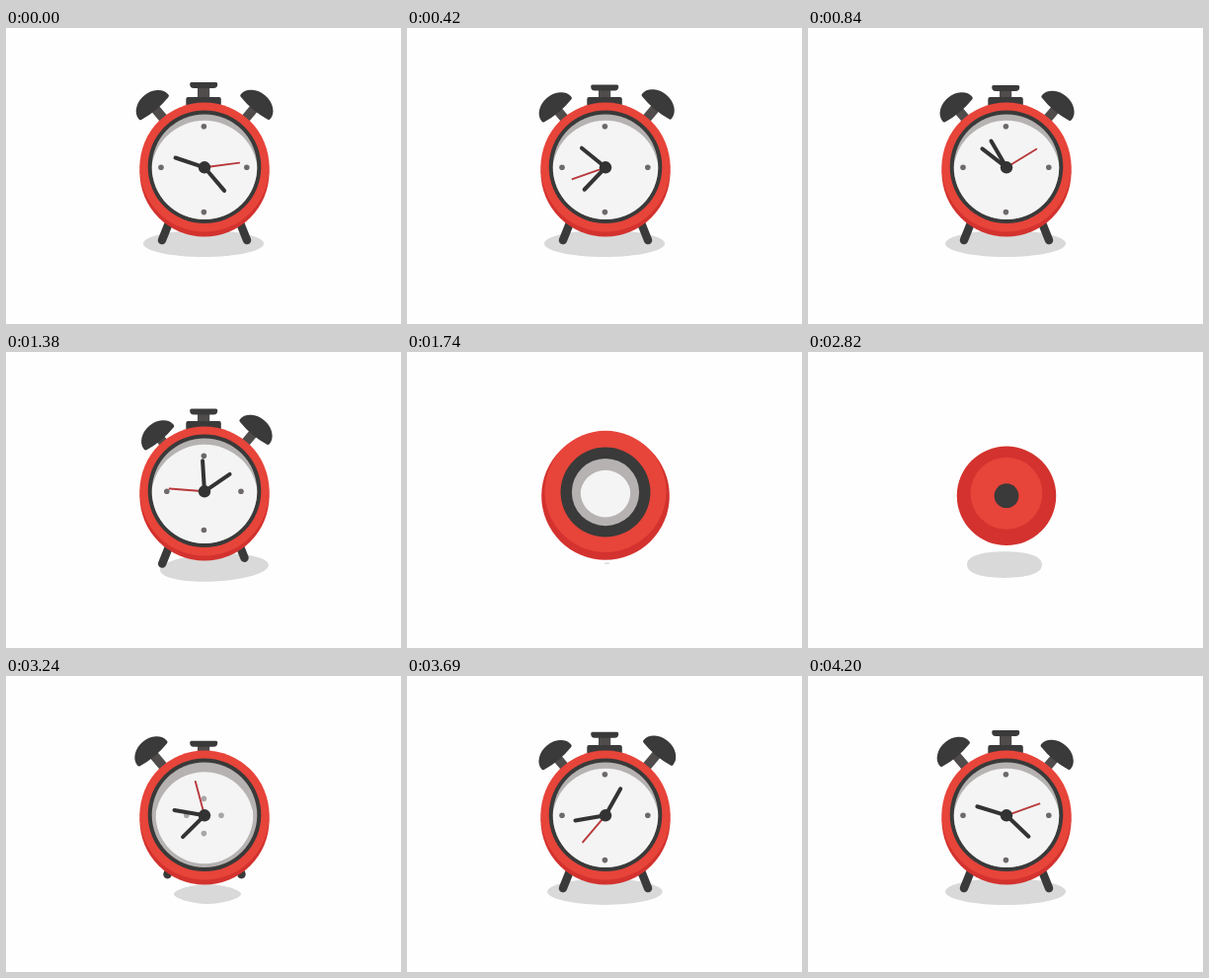
Animation, 400 px wide and 300 px high, one loop 4230 ms. Source, as an HTML page with a canvas:

```html
<!DOCTYPE html>
<html lang="en">
<head>
<meta charset="utf-8">
<title>Alarm clock</title>
<style>
  html, body { margin: 0; width: 100%; height: 100%; overflow: hidden; background: #fefefe; }
  canvas { display: block; }
</style>
</head>
<body>
<canvas width="400" height="300"></canvas>
<script>
const ctx = document.querySelector('canvas').getContext('2d');
const LOOP = 4230, STEP = 30, VANISH = 2070;
const CX = 201, CY = 141.3;
const DARK = '#393a39', STEM = '#4f4c4b', RED = '#e7443a', DEEP_RED = '#d3322e';

// Clock life runs from 2580 (appearing) to 6300 (gone).
let now = 0;

const clamp = x => Math.max(0, Math.min(1, x));

// 0..1 presence: decelerating entry, accelerating exit
function presence(inAt, inFor, outAt, outFor) {
  const enter = 1 - (1 - clamp((now - inAt) / inFor)) ** 2;
  return enter * (1 - clamp((now - outAt) / outFor) ** 2);
}

function ring(amplitude, decay, peak) {
  return amplitude * Math.exp(-decay * (now - LOOP)) * Math.cos((now - peak) / 190 * 2 * Math.PI);
}

function disc(x, y, r, color) {
  if (r <= 0) return;
  ctx.fillStyle = color;
  ctx.beginPath();
  ctx.arc(x, y, r, 0, 2 * Math.PI);
  ctx.fill();
}

function box(x, y, w, h, r, color) {
  ctx.fillStyle = color;
  ctx.beginPath();
  ctx.roundRect(x, y, w, h, r);
  ctx.fill();
}

function line(x1, y1, x2, y2, width, color) {
  ctx.strokeStyle = color;
  ctx.lineWidth = width;
  ctx.lineCap = 'round';
  ctx.beginPath();
  ctx.moveTo(x1, y1);
  ctx.lineTo(x2, y2);
  ctx.stroke();
}

// time, centre x, centre y, radius x, radius y, roundness, tilt
const shadowKeys = [
  [2580, 200, 214, 0, 0, .6, 0],
  [2820, 199, 215.6, 38, 13.3, .64, 0],
  [3240, 204, 221, 34, 10, .44, 0],
  [3800, 200, 218.5, 61, 13.5, .552, 0],
  [5340, 200, 218.5, 61, 13.5, .552, 0],
  [5610, 211, 218.5, 55, 14, .56, -.05],
  [6030, 202, 214, 0, 0, .6, 0]
];

function drawShadow() {
  const i = shadowKeys.findIndex(key => key[0] > now);
  if (i < 1) return;
  const from = shadowKeys[i - 1], to = shadowKeys[i];
  const x = (now - from[0]) / (to[0] - from[0]), ease = x * x * (3 - 2 * x);
  const [, cx, cy, rx, ry, k, tilt] = from.map((v, j) => v + (to[j] - v) * ease);
  ctx.save();
  ctx.translate(cx, cy);
  ctx.rotate(tilt);
  ctx.fillStyle = '#d9d9d9';
  ctx.beginPath();
  ctx.moveTo(rx, 0);
  for (const [a, b] of [[0, 1], [-1, 0], [0, -1], [1, 0]])
    ctx.bezierCurveTo(
      rx * (b + k * a), ry * (k * b - a),
      rx * (a + k * b), ry * (b - k * a),
      rx * a, ry * b);
  ctx.fill();
  ctx.restore();
}

function drawBell(side, shown, bounce) {
  if (shown <= 0) return;
  ctx.save();
  ctx.translate(CX, CY);
  ctx.rotate(side * 40 * Math.PI / 180);
  ctx.translate(0, 30 * (1 - shown) - bounce * shown);
  box(-4.8, -79, 9.6, 29, 0, STEM);
  ctx.fillStyle = ctx.strokeStyle = DARK;
  ctx.lineWidth = 4;
  ctx.lineJoin = 'round';
  ctx.beginPath();
  ctx.ellipse(0, -79, 17.5, 13, 0, Math.PI, 2 * Math.PI);
  ctx.quadraticCurveTo(0, -75.5, -17.5, -79);
  ctx.closePath();
  ctx.fill();
  ctx.stroke();
  ctx.restore();
}

function drawButton() {
  const cap = presence(3150, 360, 5600, 260);
  const base = presence(3260, 260, 5620, 230);
  if (cap > 0) {
    const y = 57.2 + 20 * (1 - cap) - ring(2.5, .0013, 4215) * cap;
    box(194, y + 4, 12.2, 25, 0, STEM);
    box(186.2, y, 28, 6, [1.5, 1.5, 4, 4], DARK);
  }
  if (base > 0) box(182.3, 70 + 10 * (1 - base), 35.5, 12, 2, DARK);
}

function drawFoot(side, shown) {
  if (shown <= 0) return;
  const back = 22 * (1 - shown);
  const x = CX + side * (43 - .37 * back), y = 215 - .93 * back;
  line(x, y, x - side * 8, y - 20, 8.5, DARK);
}

function drawHand(angle, speed, lag, length, width, color) {
  const settle = Math.max(0, (3900 - now) / 660) ** 2;
  const a = (angle + speed * (now - LOOP) / STEP - lag * settle) * Math.PI / 180;
  line(CX, CY, CX + length * Math.sin(a), CY - length * Math.cos(a), width, color);
}

function drawFace() {
  const rim = presence(2765, 480, 5820, 330);
  const dial = presence(2830, 400, 5790, 300);
  const glass = presence(2890, 480, 5760, 290);
  const dots = presence(3130, 480, 5500, 300);
  const hands = presence(2980, 260, 5720, 250);
  const rimY = 147 - 6.2 * rim;

  disc(CX, rimY, 57.3 * rim, DARK);
  disc(CX, rimY, 53.3 * dial, '#b6b2b2');
  ctx.save();
  ctx.beginPath();
  ctx.arc(CX, rimY, 53.3 * glass, 0, 2 * Math.PI);
  ctx.clip();
  disc(CX, rimY + 7 * glass, 54 * glass, '#f4f4f4');
  ctx.restore();

  if (dots > 0) {
    ctx.globalAlpha = Math.min(1, .15 + dots);
    const reach = 43.4 * dots, drop = 2 * dots;
    for (const [x, y] of [[-reach, 0], [reach, 0], [0, drop - reach], [0, drop + reach]])
      disc(200.4 + x, 141.2 + y, 2.8, '#6d6a69');
    ctx.globalAlpha = 1;
  }
  if (hands > 0) {
    drawHand(82.5, 12, 61.5, 35.5 * hands, 1.9, '#b8393c');
    drawHand(288.4, 1.48, 14.5, 31 * hands, 4, '#333');
    drawHand(139.6, 6, 21.6, 31 * hands, 4, '#333');
    disc(CX, CY, 6.2 * hands, '#333');
  }
}

function draw() {
  ctx.fillStyle = '#fefefe';
  ctx.fillRect(0, 0, 400, 300);
  if (now < 2580) return;

  drawShadow();
  drawFoot(-1, presence(3180, 340, 5570, 250));
  drawFoot(1, presence(3180, 340, 5460, 270));
  drawBell(-1, presence(3060, 180, 5480, 300), ring(2.7, .0002, 4195));
  drawBell(1, presence(3240, 200, 5570, 260), ring(2.7, .0008, 4262));
  drawButton();

  const body = presence(2580, 465, 5930, 370);
  const front = presence(2660, 480, 5880, 360);
  disc(CX, 145.8, 65.6 * body, DEEP_RED);
  disc(CX, 146 - 5 * front, 65.6 * front, RED);
  drawFace();
}

function frame() {
  const t = Math.floor(performance.now() % LOOP / STEP) * STEP;
  now = t < VANISH ? t + LOOP : t;
  draw();
  requestAnimationFrame(frame);
}
frame();
</script>
</body>
</html>
```
